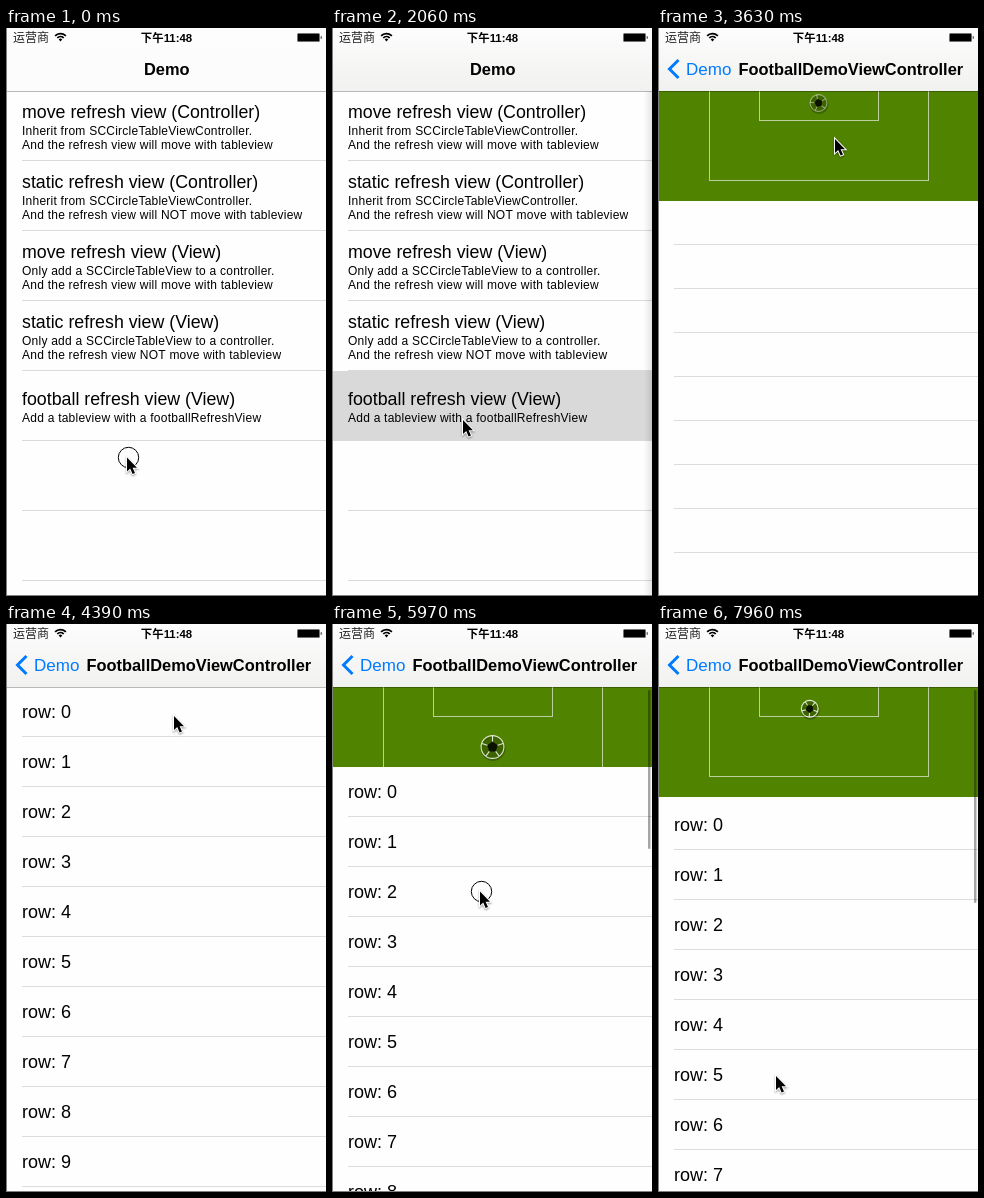
Recreate the animation shown at these times as an HTML page with a canvas. Size 320 by 568 pixels, loop 8 s.

```html
<!DOCTYPE html>
<html lang="en">
<head>
<meta charset="utf-8">
<title>Football refresh demo</title>
<style>
html, body { margin: 0; width: 100%; height: 100%; overflow: hidden; background: #fff; }
canvas { display: block; width: 320px; height: 568px; }
</style>
</head>
<body>
<canvas id="stage" width="320" height="568"></canvas>
<script>
const LOOP = 8000, PUSH = 2060, LOADED = 3690, DRAG = 4980, RELEASE = 7650;
const NAV = 63, HEADER = 173;
const SANS = '"Liberation Sans", Arial, sans-serif';
const CJK = '"Liberation Sans", "Noto Sans CJK SC", "Noto Sans CJK", sans-serif';
const ctx = document.getElementById('stage').getContext('2d');

const clamp = v => Math.max(0, Math.min(1, v));
// Remaining distance (1 to 0) of a critically damped spring.
const spring = (t, w) => t <= 0 ? 1 : (1 + w * t) * Math.exp(-w * t);

const MENU = [
  ['move refresh view (Controller)', 'Inherit from SCCircleTableViewController.', 'And the refresh view will move with tableview'],
  ['static refresh view (Controller)', 'Inherit from SCCircleTableViewController.', 'And the refresh view will NOT move with tableview'],
  ['move refresh view (View)', 'Only add a SCCircleTableView to a controller.', 'And the refresh view will move with tableview'],
  ['static refresh view (View)', 'Only add a SCCircleTableView to a controller.', 'And the refresh view NOT move with tableview'],
  ['football refresh view (View)', 'Add a tableview with a footballRefreshView']
];

// Pointer keys: time, x, y
const POINTER = [
  [0, 121, 429.5], [60, 123, 430], [300, 158, 418], [420, 171, 404], [600, 152, 382],
  [810, 128, 394], [870, 128, 394], [920, 131, 392], [2600, 131, 392], [2850, 132, 364],
  [3250, 160, 225], [3500, 180, 128], [3630, 177, 111], [3700, 177, 111], [4300, 168, 92],
  [4980, 168, 92], [5330, 163, 152], [6580, 134, 377], [6640, 134, 377], [6990, 118, 452],
  [8000, 118, 452]
];

function pointerAt(t) {
  const i = Math.max(1, POINTER.findIndex(k => k[0] >= t));
  const [t0, x0, y0] = POINTER[i - 1], [t1, x1, y1] = POINTER[i];
  const p = clamp((t - t0) / (t1 - t0));
  return [x0 + (x1 - x0) * p, y0 + (y1 - y0) * p];
}

function rect(color, x, y, w, h) {
  ctx.fillStyle = color;
  ctx.fillRect(x, y, w, h);
}

function text(str, x, y, font, color = '#000', spacing = 0) {
  ctx.font = font;
  ctx.letterSpacing = spacing + 'px';
  ctx.fillStyle = color;
  ctx.fillText(str, x, y);
}

function layer(alpha, x, draw) {
  ctx.save();
  ctx.globalAlpha = alpha;
  ctx.translate(x, 0);
  draw();
  ctx.restore();
}

function menuPage(selected) {
  rect('#fefefe', 0, 0, 420, 568);
  if (selected) rect('#d9d9d9', 0, 343, 420, 70);
  for (let i = 0; i < 7; i++) {
    const y = NAV + 70 * i;
    rect('#dadada', 16, y + 69, 404, 1);
    if (!MENU[i]) continue;
    const [title, ...lines] = MENU[i];
    const shift = lines.length === 1 ? 7 : 0;
    text(title, 16, y + 27 + shift, '17.8px ' + SANS);
    lines.forEach((s, n) => text(s, 16, y + 44 + shift + 14 * n, '12px ' + SANS, '#000', 0.24));
  }
}

// Where the table content begins.
function tableTop(t) {
  if (t < LOADED) return HEADER - 110 * spring(t - PUSH, 0.0137);
  if (t < DRAG) return NAV + 110 * spring(t - LOADED, 0.0137);
  const d = Math.max(0, pointerAt(t)[1] - 92);
  const pulled = NAV + 0.5558 * d / (1 + 0.001262 * d);
  return HEADER + (pulled - HEADER) * spring(t - RELEASE, 0.0125);
}

function ball(t) {
  let kick = 0, spin = 0;
  if (t < DRAG || t >= RELEASE) {
    const s = t - (t < DRAG ? PUSH : RELEASE);
    kick = clamp((s - 174) / 172);
    spin = s / 160;
  }
  const r = 12 - 3 * Math.min(1, 2 * kick);
  ctx.save();
  ctx.translate(160.5 - 19 * Math.pow(Math.sin(Math.PI * kick), 1.5), 123 - 48 * kick);
  ctx.beginPath();
  ctx.arc(0.5, 1.5, r + 0.5, 0, 7);
  ctx.fillStyle = 'rgba(0,0,0,.25)';
  ctx.fill();
  ctx.rotate(spin);
  ctx.strokeStyle = `rgba(250,252,245,${kick === 1 ? 0.45 : 0.85})`;
  ctx.lineWidth = 1.1;
  ctx.beginPath();
  ctx.arc(0, 0, r - 0.6, 0, 7);
  ctx.stroke();
  const corner = (i, k) => {
    const a = i * Math.PI * 0.4 - Math.PI / 2;
    return [Math.cos(a) * r * k, Math.sin(a) * r * k];
  };
  ctx.beginPath();
  for (let i = 0; i < 5; i++) {
    ctx.moveTo(...corner(i, 0.4));
    ctx.lineTo(...corner(i, 0.92));
  }
  ctx.stroke();
  ctx.beginPath();
  for (let i = 0; i < 5; i++) ctx.lineTo(...corner(i, 0.46));
  ctx.fillStyle = '#0c1200';
  ctx.fill();
  ctx.restore();
}

function pitch(t) {
  rect('#508400', 0, NAV, 320, 110);
  ctx.save();
  ctx.beginPath();
  ctx.rect(0, NAV, t > DRAG && t < 5450 ? 120 : 320, 110);
  ctx.clip();
  ctx.strokeStyle = 'rgba(255,255,255,.62)';
  ctx.lineWidth = 1;
  ctx.strokeRect(51.5, 20.5, 219, 132);
  ctx.strokeRect(101.5, 20.5, 119, 72);
  ctx.restore();
  ball(t);
}

function tablePage(t) {
  const top = Math.round(tableTop(t));
  const filled = t >= LOADED;
  const rowH = filled ? 50 : 44;
  rect('#fefefe', 0, 0, 320, 568);
  pitch(t);
  if (filled) rect('#fefefe', 0, top, 320, 568 - top);
  for (let i = 0, y = top; y < 568; i++, y += rowH) {
    rect('#dcdcdc', 16, y + rowH - 1, 304, 1);
    if (filled) text('row: ' + i, 16, y + 31, '18px ' + SANS);
  }
  if (t > DRAG) {
    const end = t < RELEASE ? 274 - (top - 94) : 282 - (top - HEADER);
    ctx.fillStyle = 'rgba(0,0,0,.35)';
    ctx.beginPath();
    ctx.roundRect(316, 66, 2.5, end - 66, 1.25);
    ctx.fill();
  }
}

function statusBar() {
  text('运营商', 7, 13.5, '12px ' + CJK, '#222');
  ctx.textAlign = 'center';
  text('下午11:48', 160.5, 13.5, 'bold 11.4px ' + CJK);
  ctx.textAlign = 'left';
  ctx.strokeStyle = '#000';
  ctx.lineWidth = 1.7;
  for (const r of [4.4, 7.4]) {
    ctx.beginPath();
    ctx.arc(54.5, 13, r, -Math.PI * 0.76, -Math.PI * 0.24);
    ctx.stroke();
  }
  ctx.fillStyle = '#000';
  ctx.beginPath();
  ctx.moveTo(54.5, 13.5);
  ctx.arc(54.5, 13, 2.3, -Math.PI * 0.78, -Math.PI * 0.22);
  ctx.fill();
  ctx.fillRect(292, 6, 21, 7);
  ctx.fillStyle = 'rgba(0,0,0,.55)';
  ctx.beginPath();
  ctx.roundRect(291, 5, 23, 9, 1.5);
  ctx.roundRect(314.5, 8, 1.5, 3, 0.7);
  ctx.fill();
}

function navBar(left) {
  const p = 1 - left;
  const bar = ctx.createLinearGradient(0, 0, 0, NAV);
  bar.addColorStop(0, '#fdfdfd');
  bar.addColorStop(1, p > 0 ? '#f1f1f0' : '#fcfcfc');
  rect(bar, 0, 0, 320, NAV);
  rect('rgba(0,0,0,.28)', 0, NAV, 320, 1);
  statusBar();
  const bold = 'bold 16.4px ' + SANS;
  layer(left * left, -110 * p, () => text('Demo', 138, 47, bold));
  if (p <= 0) return;
  layer(Math.pow(p, 16), 0, () => {
    ctx.strokeStyle = '#007aff';
    ctx.lineWidth = 3;
    ctx.beginPath();
    ctx.moveTo(20.5, 32);
    ctx.lineTo(11.5, 41);
    ctx.lineTo(20.5, 50);
    ctx.stroke();
    text('Demo', 28 + 110 * left, 47, '17px ' + SANS, '#007aff');
  });
  layer(p, 240 * left, () => text('FootballDemoViewController', 80.5, 47, bold));
}

function pointer(t) {
  const [x, y] = pointerAt(t).map(v => Math.round(v * 2) / 2);
  ctx.save();
  ctx.translate(x, y);
  if (t < 60 || (t >= DRAG && t < RELEASE)) {
    ctx.strokeStyle = '#000';
    ctx.lineWidth = 1;
    ctx.beginPath();
    ctx.arc(1.5, 0, 10.2, 0, 7);
    ctx.stroke();
  }
  ctx.shadowColor = 'rgba(0,0,0,.4)';
  ctx.shadowBlur = 2;
  ctx.shadowOffsetY = 1;
  const arrow = new Path2D('M0 0V14L3.2 11L5.6 16.5L8 15.4L5.6 10.2H10Z');
  ctx.strokeStyle = '#fff';
  ctx.lineWidth = 2;
  ctx.stroke(arrow);
  ctx.shadowColor = 'transparent';
  ctx.fillStyle = '#000';
  ctx.fill(arrow);
  ctx.restore();
}

function draw(t) {
  let left = spring(t - PUSH, 0.0158);
  if (left < 0.002) left = 0;
  const edge = Math.round(320 * left);
  if (left > 0) {
    layer(1, -96 * (1 - left), () => menuPage(t >= PUSH));
    rect(`rgba(0,0,0,${0.1 * (1 - left)})`, 0, 0, 320, 568);
  }
  if (left < 1) {
    const shade = ctx.createLinearGradient(edge - 8, 0, edge, 0);
    shade.addColorStop(0, 'rgba(0,0,0,0)');
    shade.addColorStop(1, 'rgba(0,0,0,.1)');
    rect(shade, edge - 8, NAV, 8, 505);
    layer(1, edge, () => tablePage(t));
  }
  navBar(left);
  rect('#808080', 0, 0, 1, 568);
  rect('#808080', 0, 567, 320, 1);
  pointer(t);
}

function frame(now) {
  draw(now % LOOP);
  requestAnimationFrame(frame);
}
requestAnimationFrame(frame);
</script>
</body>
</html>
```
